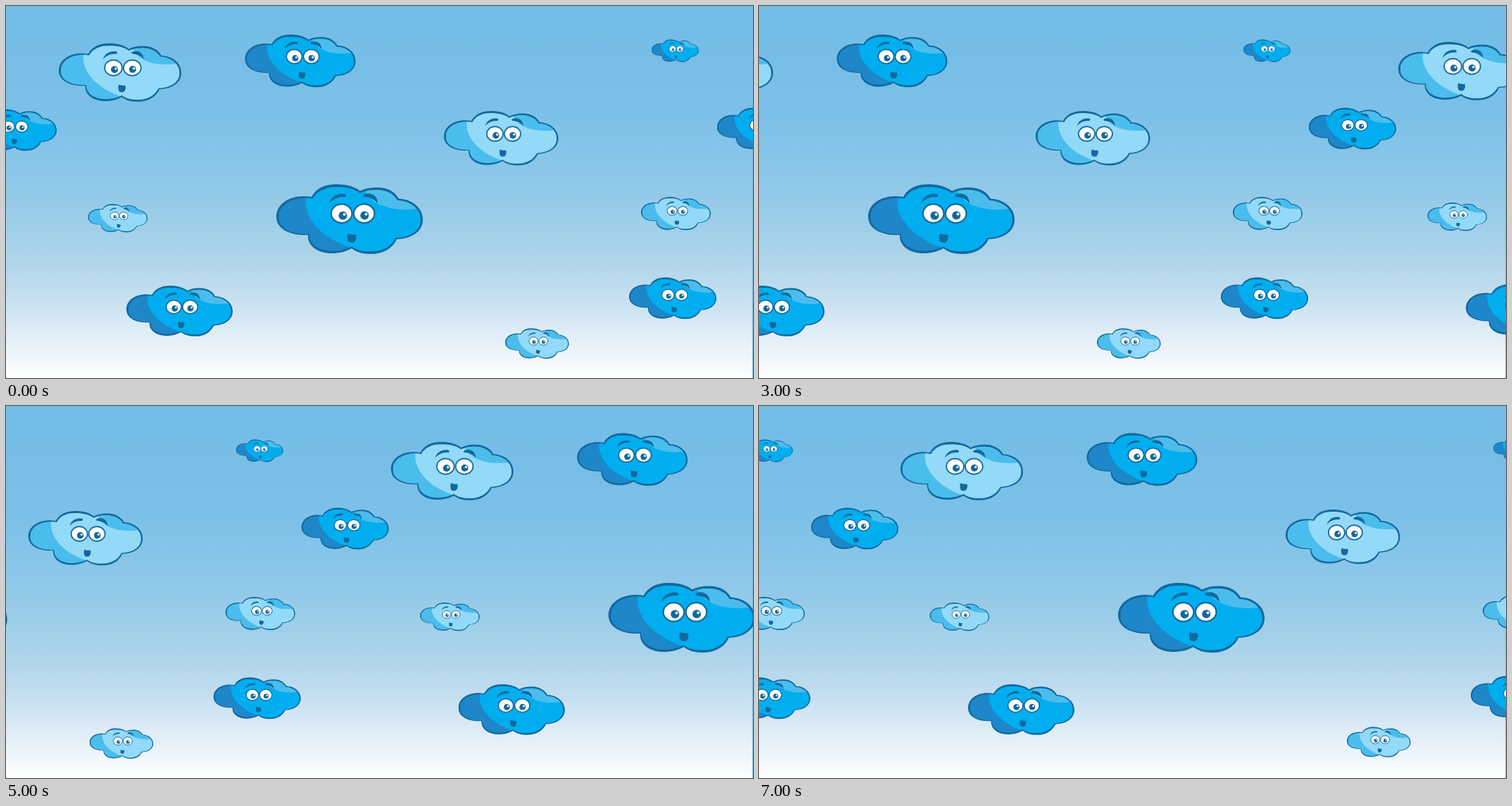
An HTML page that plays this animation: 1061 px wide and 528 px high, repeating every 7500 ms.

```html
<!DOCTYPE html>
<html lang="en">
<head>
<meta charset="utf-8">
<title>Drifting clouds</title>
<style>
html, body { margin: 0; width: 100%; height: 100%; overflow: hidden; }
svg { display: block; width: 100%; height: 100%; }
</style>
</head>
<body>
<svg viewBox="0 0 1061 528" preserveAspectRatio="none">
  <defs>
    <linearGradient id="sky" x1="0" y1="0" x2="0" y2="1">
      <stop offset="0" stop-color="#72bce6"/>
      <stop offset=".28" stop-color="#7bc0e8"/>
      <stop offset=".36" stop-color="#82c3e8"/>
      <stop offset=".48" stop-color="#8fc8e8"/>
      <stop offset=".6" stop-color="#a0cfe9"/>
      <stop offset=".68" stop-color="#aed5eb"/>
      <stop offset=".76" stop-color="#c0dcee"/>
      <stop offset=".86" stop-color="#daeaf5"/>
      <stop offset=".94" stop-color="#eff6fb"/>
      <stop offset="1" stop-color="#fefefe"/>
    </linearGradient>
    <path id="shape" d="M50 18C56 6 69 0 85 0C99 0 111 3 119 9.500C126 6 134 4.500 143 4.500C157 4.500 168 10 174 20.500C191 21 208 32 208 50C208 66 194 77 171 78C165 91 152 99 134 99C122 99 113 96 107 91C98 96 88 98 79 98C58 98 44 87 45 72C20 73 0 64 0 46C0 26 23 13 50 18Z"/>
    <clipPath id="inside"><use href="#shape"/></clipPath>
    <g id="face" fill="#12699d">
      <path d="M75 27C78 17 88 12 98 14C100 15 99 18 97 18C89 18 83 19 75 27Z"/>
      <path d="M125 14C136 11 144 17 144 27C138 20 133 19 126 18C123 18 123 15 125 14Z"/>
      <g fill="#fff" stroke="#12699d" stroke-width="2.200">
        <ellipse cx="92.700" cy="41.500" rx="14.800" ry="13.300"/>
        <ellipse cx="124.700" cy="41.500" rx="14.800" ry="13.300"/>
      </g>
      <circle cx="94.500" cy="44.500" r="6"/>
      <circle cx="125.300" cy="44.300" r="6"/>
      <g fill="#fff">
        <circle cx="96.700" cy="42.800" r="2"/>
        <circle cx="127.500" cy="42.600" r="2"/>
      </g>
      <path d="M101.500 70Q107 72 113 71.500Q115 79 110 82.500Q105 84 102 81Q100 76 101.500 70Z"/>
    </g>
  </defs>
  <rect width="1061" height="528" fill="url(#sky)"/>
  <rect x="1060" width="1" height="528" fill="#73bbe5"/>
  <g id="drift"></g>
</svg>
<script>
const LOOP = 7500, STEP = 500, SPAN = 1062, RISE = -2;

// left, top, width, palette
const clouds = [
  [75, 53, 174, 'light'], [339.5, 40.5, 157, 'deep'], [917, 47.5, 67, 'deep'],
  [-52, 146.5, 124, 'deep'], [622, 149, 162.5, 'light'], [384, 253, 208, 'deep'],
  [116.5, 281, 84.5, 'light'], [902, 271, 99, 'light'], [885, 385.3, 124, 'deep'],
  [171, 397, 151, 'deep'], [709, 457.5, 90.5, 'light']
];
const palettes = {
  deep: { body: '#00aeef', shade: '#1d87c9', shine: '#4bbdec' },
  light: { body: '#93d9f8', shade: '#4abdec', shine: '#4abdec' }
};
// step index, distance travelled
const keys = [[0, 0], [4, 132], [6, 229], [8, 415.5], [10, 590.3], [13, 819.3], [14, 936], [15, SPAN]];

// The coloured inside is a slightly smaller copy of the dark silhouette.
function cloud([x, y, w, name]) {
  const c = palettes[name];
  return `<g transform="translate(${x} ${y}) scale(${w / 208})">
    <use href="#shape" fill="#12699d"/>
    <g transform="translate(3.200 3.900) scale(.97 .926)"><g clip-path="url(#inside)">
      <path fill="${c.shade}" d="M0 0H208V99H0Z"/>
      <path fill="${c.body}" d="M40 0V15C35 42 58 78 111 95L134 110H220V0Z"/>
      <path fill="${c.shine}" d="M128 0V8C137 28 168 39 206 33V0Z"/>
    </g></g>
    <use href="#face"/>
  </g>`;
}

function distance(step) {
  const i = keys.findIndex(k => k[0] > step);
  const [s0, d0] = keys[i - 1], [s1, d1] = keys[i];
  return d0 + (d1 - d0) * (step - s0) / (s1 - s0);
}

const drift = document.getElementById('drift');
const row = clouds.map(cloud).join('');
drift.innerHTML = `<g>${row}</g><g transform="translate(${SPAN} ${RISE})">${row}</g>`;

function draw(now) {
  const step = Math.floor(now % LOOP / STEP);
  drift.setAttribute('transform', `translate(${-distance(step)} 0)`);
}

const start = performance.now();
function tick() {
  draw(performance.now() - start);
  requestAnimationFrame(tick);
}
tick();
</script>
</body>
</html>
```
